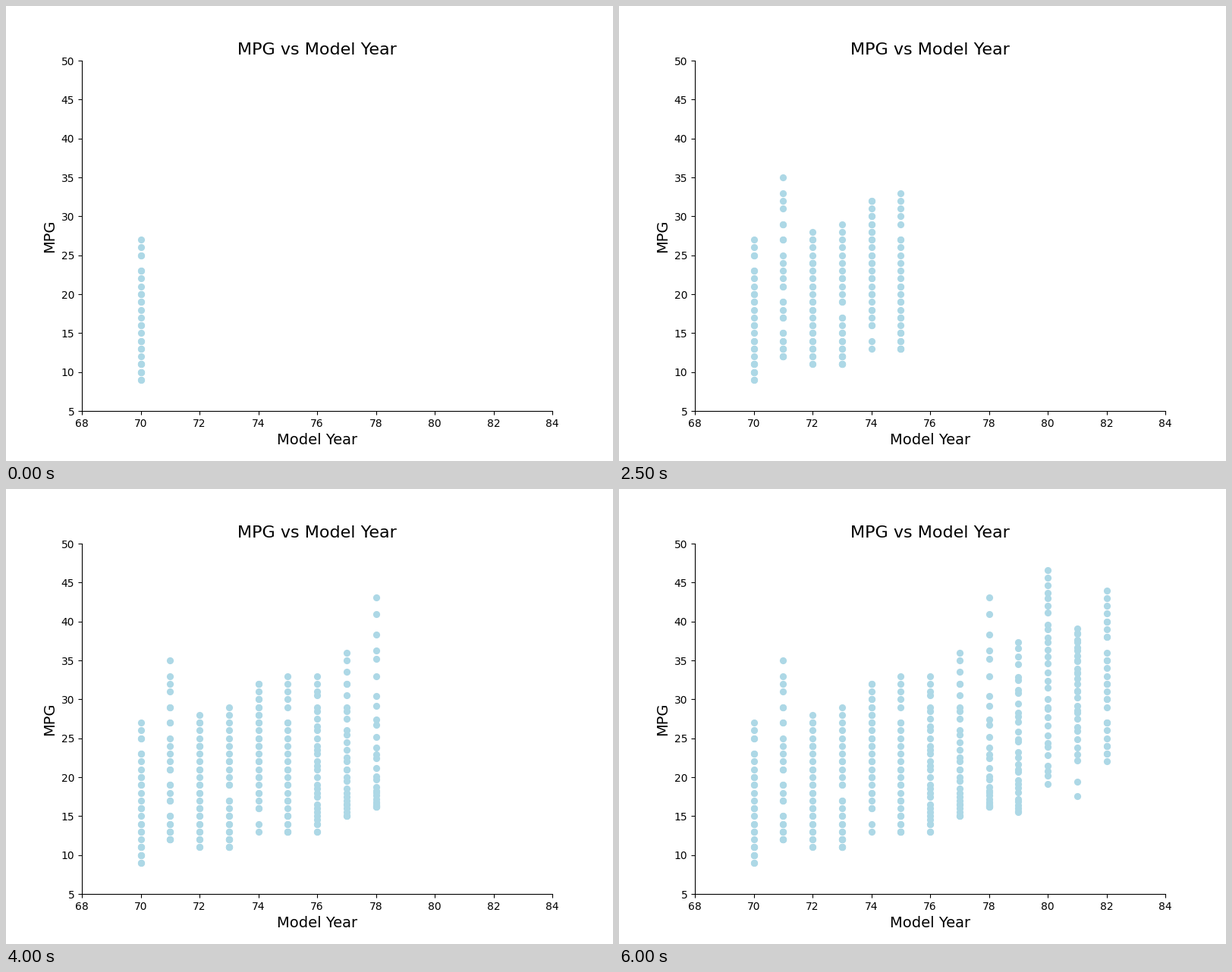
A matplotlib script for the animation above (6.5 s loop, 800 by 600 pixels).

```python
import numpy as np
import matplotlib.pyplot as plt
from matplotlib.animation import FuncAnimation

FIRST_YEAR = 70
CARS = 30

plt.rcParams["font.family"] = "DejaVu Sans"

# Per model year: lowest, median and highest mileage, and the rounding step.
SPREAD = [
    (9, 16, 27, 1),
    (12, 19, 35, 1),
    (11, 18.5, 28, 1),
    (11, 16.5, 29, 1),
    (13, 24, 32, 1),
    (13, 19.5, 33, 1),
    (13, 21, 33, 0.5),
    (15, 21.7, 36, 0.5),
    (16.2, 20.7, 43.1, 0.1),
    (15.5, 23.9, 37.3, 0.1),
    (19.1, 32.7, 46.6, 0.1),
    (17.6, 31.6, 39.1, 0.1),
    (22, 32, 44, 1),
]

rng = np.random.default_rng(7)


def mileages(low, median, high, step):
    """Spread the cars along a power curve through the three key values."""
    rank = np.linspace(0, 1, CARS)
    rank[1:-1] += rng.uniform(-0.5, 0.5, CARS - 2) / CARS
    power = np.log((median - low) / (high - low)) / np.log(0.5)
    mpg = low + (high - low) * rank ** power
    return np.round(mpg / step) * step


mpg = np.concatenate([mileages(*row) for row in SPREAD])
year = np.repeat(FIRST_YEAR + np.arange(len(SPREAD)), CARS)

fig, ax = plt.subplots(figsize=(8, 6), dpi=100)
ax.set(xlim=(68, 84), ylim=(5, 50))
ax.set_title("MPG vs Model Year", fontsize=16)
ax.set_xlabel("Model Year", fontsize=14)
ax.set_ylabel("MPG", fontsize=14)
ax.spines[["top", "right"]].set_visible(False)
dots, = ax.plot([], [], "o", color="lightblue", markersize=5.6)


def update(step):
    shown = year <= FIRST_YEAR + step
    dots.set_data(year[shown], mpg[shown])
    return dots,


anim = FuncAnimation(fig, update, frames=len(SPREAD), interval=500,
                     repeat=True, repeat_delay=0)
plt.show()
```
